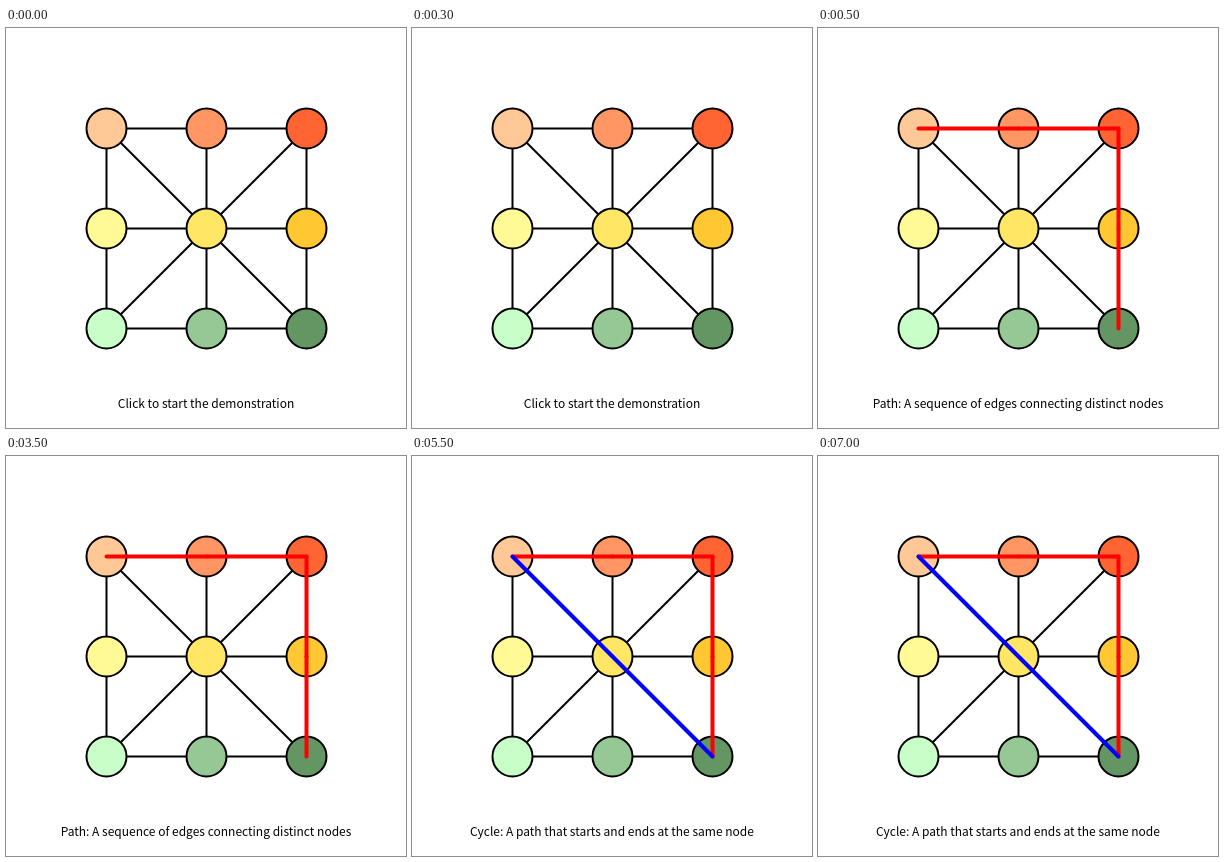
An HTML page with a canvas that plays this animation: 400 px wide and 400 px high, repeating every 8 s.

```html
<!DOCTYPE html>
<html lang="en">
<head>
<meta charset="utf-8">
<title>Paths and cycles</title>
<style>
  html, body { margin: 0; width: 100%; height: 100%; overflow: hidden; background: #fff; }
  canvas { display: block; }
</style>
</head>
<body>
<canvas id="stage" width="400" height="400"></canvas>
<script>
const ctx = document.getElementById('stage').getContext('2d');
const LOOP = 8000;

// Nodes are numbered 0-8, row by row.
const nodeColors = [
  '#ffc896', '#ff9664', '#ff6432',
  '#fffa96', '#ffe664', '#ffc832',
  '#c8ffc8', '#96c896', '#649664'
];
const edges = [
  [0, 1], [1, 2], [3, 4], [4, 5], [6, 7], [7, 8],
  [0, 3], [3, 6], [1, 4], [4, 7], [2, 5], [5, 8],
  [0, 4], [4, 8], [2, 4], [4, 6]
];
const path = [[0, 1], [1, 2], [2, 5], [5, 8]];
const closing = [[8, 0]];

const scenes = [
  { start: 0, caption: 'Click to start the demonstration' },
  { start: 500, caption: 'Path: A sequence of edges connecting distinct nodes', path },
  { start: 5500, caption: 'Cycle: A path that starts and ends at the same node', path, closing }
];

const position = i => [100.5 + 100 * (i % 3), 100.5 + 100 * Math.floor(i / 3)];

function drawEdges(list = [], color, width) {
  ctx.strokeStyle = color;
  ctx.lineWidth = width;
  ctx.lineCap = 'round';
  for (const [from, to] of list) {
    ctx.beginPath();
    ctx.moveTo(...position(from));
    ctx.lineTo(...position(to));
    ctx.stroke();
  }
}

function drawNode(color, i) {
  ctx.beginPath();
  ctx.arc(...position(i), 20, 0, 2 * Math.PI);
  ctx.fillStyle = color;
  ctx.fill();
  ctx.strokeStyle = '#000';
  ctx.lineWidth = 2;
  ctx.stroke();
}

function draw(now) {
  const time = now % LOOP;
  const scene = scenes.findLast(s => s.start <= time);
  ctx.fillStyle = '#fff';
  ctx.fillRect(0, 0, 400, 400);
  drawEdges(edges, '#000', 2);
  nodeColors.forEach(drawNode);
  drawEdges(scene.path, '#f00', 4);
  drawEdges(scene.closing, '#00f', 4);
  ctx.fillStyle = '#000';
  ctx.font = '12px "Noto Sans CJK SC", "Noto Sans CJK JP", "Noto Sans CJK", sans-serif';
  ctx.textAlign = 'center';
  ctx.fillText(scene.caption, 200, 380);
  requestAnimationFrame(draw);
}

requestAnimationFrame(draw);
</script>
</body>
</html>
```
